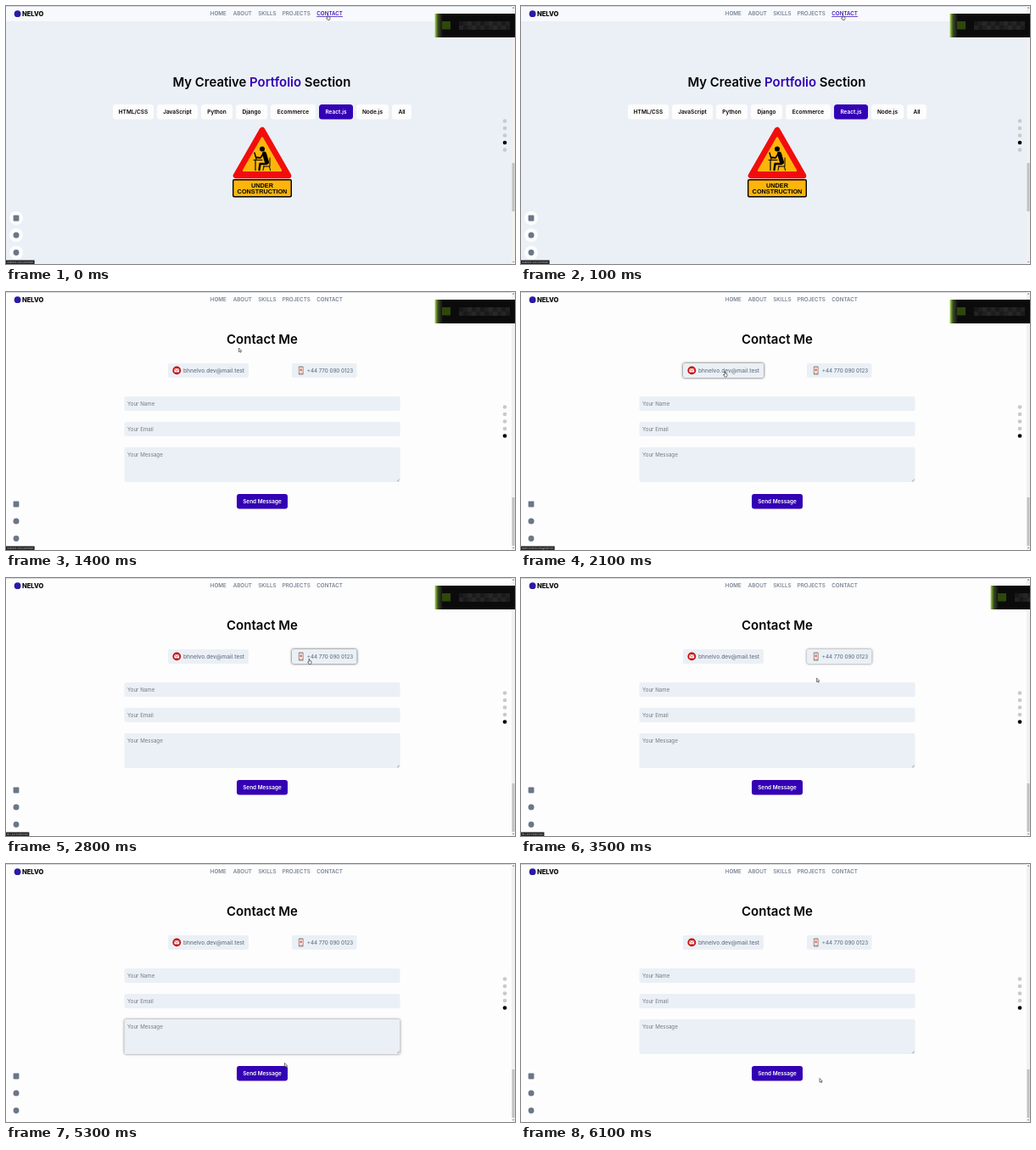
Animation of 600x304 px, one loop 7.7 s. Source, as an HTML page with a canvas:

```html
<!DOCTYPE html>
<html lang="en">
<head>
<meta charset="utf-8">
<title>Portfolio contact page</title>
<style>
html, body { margin: 0; width: 100%; height: 100%; overflow: hidden; background: #fdfdfd; }
canvas { display: block; width: 600px; height: 304px; }
</style>
</head>
<body>
<canvas id="stage" width="600" height="304"></canvas>
<script>
const ctx = document.getElementById('stage').getContext('2d');
const LOOP = 7700, STEP = 100;
const SANS = 'Inter, sans-serif', ARIAL = '"Liberation Sans", Arial, sans-serif';
const PAGE = '#fdfdfd', PALE = '#ebf0f6', GRAY = '#6b7688', PURPLE = '#3302b5', BLACK = '#030303';

const clamp = v => Math.min(1, Math.max(0, v));
const mix = (a, b, k) => a + (b - a) * k;
const smooth = k => k * k * (3 - 2 * k);
const progress = (t, from, to) => clamp((t - from) / (to - from));
// Fades in after `on` and out after `off`, 300 ms each.
const hover = (t, on, off) => progress(t, on, on + 300) * (1 - progress(t, off, off + 300));

function rect(x, y, w, h, color) {
  ctx.fillStyle = color;
  ctx.fillRect(x, y, w, h);
}

function box(x, y, w, h, r, color) {
  ctx.fillStyle = color;
  ctx.beginPath();
  ctx.roundRect(x, y, w, h, r);
  ctx.fill();
}

function circle(x, y, r, color) {
  ctx.fillStyle = color;
  ctx.beginPath();
  ctx.arc(x, y, r, 0, Math.PI * 2);
  ctx.fill();
}

function trace(points, closed) {
  ctx.beginPath();
  points.forEach(([x, y]) => ctx.lineTo(x, y));
  if (closed) ctx.closePath();
}

function line(points, color, width) {
  trace(points);
  ctx.strokeStyle = color;
  ctx.lineWidth = width;
  ctx.stroke();
}

// Text is centred vertically on the capitals.
function text(str, x, y, size, color, weight = 400, align = 'left', family = SANS) {
  ctx.font = `${weight} ${size}px ${family}`;
  ctx.textAlign = align;
  ctx.fillStyle = color;
  ctx.fillText(str, x, y + size * 0.36);
  return ctx.measureText(str).width;
}

function shadowBox(x, y, w, h, glow) {
  ctx.save();
  if (glow > 0) {
    ctx.shadowColor = `rgba(25,25,30,${0.9 * glow})`;
    ctx.shadowBlur = 3;
  }
  box(x, y, w, h, 2, PALE);
  ctx.restore();
}

function roundedTriangle(points, radius, color) {
  trace(points, true);
  ctx.fillStyle = ctx.strokeStyle = color;
  ctx.lineJoin = 'round';
  ctx.lineWidth = radius * 2;
  ctx.fill();
  ctx.stroke();
}

function sign() {
  roundedTriangle([[302, 146], [271, 200], [333, 200]], 3.3, '#f20d0d');
  roundedTriangle([[302, 155.5], [280, 193.8], [324, 193.8]], 1.2, '#fdb50b');
  ctx.lineCap = 'round';
  circle(302, 168.5, 3, BLACK);
  line([[304.5, 174], [307.5, 184]], BLACK, 5);
  line([[303, 174.5], [300, 179], [295.5, 178.5]], BLACK, 1.8);
  line([[307, 186], [299.5, 186], [298.5, 193]], BLACK, 2.4);
  line([[292, 181.5], [302, 181.5]], BLACK, 1.2);
  line([[294, 181], [294, 193.5]], BLACK, 1.2);
  line([[295, 180], [293, 173]], BLACK, 1.5);
  line([[303, 189], [311, 189], [311, 179]], BLACK, 1);
  line([[310.5, 189], [311.5, 193.5]], BLACK, 1);
  line([[304, 189], [303, 193.5]], BLACK, 1);
  box(267, 204, 70, 21.5, 2, BLACK);
  box(268.4, 205.4, 67.2, 18.7, 1, '#fdb50b');
  text('UNDER', 302, 211.2, 7.3, BLACK, 700, 'center', ARIAL);
  text('CONSTRUCTION', 302, 218.6, 7.3, BLACK, 700, 'center', ARIAL);
}

function projects() {
  rect(0, 0, 600, 304, PALE);
  let x = 196.5;
  for (const [part, color] of [['My Creative ', BLACK], ['Portfolio', PURPLE], [' Section', BLACK]])
    x += text(part, x, 89.5, 14.9, color, 600);
  const filters = [
    ['HTML/CSS', 126, 174], ['JavaScript', 178, 226], ['Python', 230, 267], ['Django', 271, 308],
    ['Ecommerce', 312, 365], ['React.js', 369, 409], ['Node.js', 413, 451], ['All', 455, 478]
  ];
  for (const [label, left, right] of filters) {
    const active = label === 'React.js';
    box(left, 116, right - left, 17.5, 3.5, active ? PURPLE : '#fdfdfe');
    text(label, (left + right) / 2, 124.9, 6.5, active ? '#fff' : BLACK, 600, 'center');
  }
  sign();
}

function contactCards(t) {
  shadowBox(191, 84, 95, 17, hover(t, 1500, 2200));
  circle(201.3, 92.4, 4.9, '#c5100f');
  box(198.4, 90.2, 5.8, 4.4, 0.5, '#fff');
  line([[198.6, 90.6], [201.3, 92.9], [204, 90.6]], '#c5100f', 0.7);
  text('bhnelvo.dev@mail.test', 209, 92.5, 6.6, GRAY, 500);

  shadowBox(337, 84, 76.5, 17, hover(t, 2450, 3400));
  box(344.8, 87.4, 5.8, 10.2, 1, '#8b8583');
  box(345.6, 88.8, 4.2, 7, 0.3, '#f6dfd9');
  rect(346.4, 90.6, 2.4, 2.4, '#e5705d');
  circle(347.7, 96.7, 0.5, '#fff');
  text('+44 770 090 0123', 354.8, 92.5, 6.2, GRAY, 500);
}

function contact(t) {
  rect(0, 0, 600, 304, PAGE);
  ctx.save();
  ctx.globalAlpha = progress(t, 850, 1150);
  ctx.translate(0, 50 * (1 - smooth(progress(t, 800, 1200))));
  text('Contact Me', 302, 55.3, 15, BLACK, 600, 'center');
  contactCards(t);
  const fields = [
    ['Your Name', 123, 17, hover(t, 3600, 4200)],
    ['Your Email', 153, 17, hover(t, 4200, 4750)],
    ['Your Message', 183, 41, hover(t, 4850, 5200)]
  ];
  for (const [label, y, h, glow] of fields) {
    shadowBox(139.5, y, 325, h, glow);
    text(label, 143, y + 8.5, 6.2, '#757a80');
  }
  line([[461, 223], [463.5, 220.5]], '#888', 0.5);
  line([[462.4, 223], [463.5, 221.9]], '#888', 0.5);
  box(272, 238, 60, 17.5, 3, t >= 5500 && t < 5900 ? '#2620b0' : PURPLE);
  text('Send Message', 302, 246.9, 6.4, '#fff', 600, 'center');
  ctx.restore();
}

function navigation(t, onProjects) {
  rect(0, 0, 600, 18, onProjects ? '#f7f9fc' : PAGE);
  rect(0, 0, 600, 1, '#d3d6da');
  circle(13.6, 9.2, 3.9, '#2a1ba5');
  text('NELVO', 19, 9.2, 7.5, BLACK, 800);
  const links = [['HOME', 240.7], ['ABOUT', 267.7], ['SKILLS', 297.3], ['PROJECTS', 325.7], ['CONTACT', 366.2]];
  for (const [label, x] of links) {
    const lit = label === 'CONTACT' && t < 1250;
    const width = text(label, x, 9.2, 6.3, lit ? PURPLE : GRAY, 500);
    if (lit) rect(x, 12.3, width, 0.7, PURPLE);
  }
}

function sidebars(onProjects) {
  for (const y of [250, 270, 290.5]) circle(12, y, 8, onProjects ? '#fcfdfe' : '#fefefe');
  box(8.6, 246.6, 6.8, 6.8, 0.8, GRAY);
  circle(12, 270, 3.5, GRAY);
  circle(12, 290.5, 3.4, GRAY);
  for (let i = 0; i < 5; i++)
    circle(588, 135.5 + i * 8.5, 2.3, i === (onProjects ? 3 : 4) ? '#000' : '#c9c9c9');
  rect(596, 0, 4, 304, '#f1f1f1');
  rect(596.5, onProjects ? 185 : 242, 3, 57, '#c1c1c1');
  rect(597.3, 1.6, 1.6, 1, '#555');
  rect(597.3, 301, 1.6, 1, '#777');
}

function statusBar(t) {
  let label = '';
  if (t < 1500) label = 'localhost:3000/#contact';
  else if (t >= 1600 && t < 2500) label = 'mailto:bhnelvo.dev@mail.test';
  else if (t >= 2500 && t < 3700) label = 'tel:+447700900123';
  if (!label) return;
  ctx.font = `400 2.7px ${SANS}`;
  rect(0, 299.5, ctx.measureText(label).width + 2.4, 4.5, '#202124');
  text(label, 1, 301.8, 2.7, '#c8cacc');
}

function notification(t) {
  if (t >= 3700) return;
  ctx.save();
  ctx.translate(96 * smooth(progress(t, 3300, 3700)), 0);
  const edge = ctx.createLinearGradient(505, 0, 515, 0);
  edge.addColorStop(0, '#c4dc94');
  edge.addColorStop(0.2, '#77a629');
  edge.addColorStop(0.42, '#3c4a2a');
  edge.addColorStop(1, '#0b0b0b');
  rect(505.5, 9, 95, 28, edge);
  rect(514, 18, 10, 9.5, '#2e480c');
  for (let i = 0; i < 12; i++)
    for (let row = 0; row < 2; row++) {
      const shade = 24 + (i * 7 + row * 11) % 17;
      rect(534 + i * 5, 18 + row * 5, 5, 5, `rgb(${shade},${shade},${shade})`);
    }
  ctx.restore();
}

const PATH = [
  [0, 379, 10.5], [1100, 379, 10.5], [1400, 274.5, 66], [1700, 236, 92], [1900, 240, 94],
  [2100, 240, 94], [2700, 357, 95.5], [3200, 357, 95.5], [3600, 347, 122], [3900, 342, 132],
  [4000, 342, 133], [4300, 335.8, 155.5], [4700, 332, 168], [5000, 328, 205], [5300, 328.5, 234.5],
  [5500, 328, 247], [5800, 328, 248], [6100, 352, 252.5], [LOOP, 352, 252.5]
];

function cursorAt(t) {
  const i = Math.max(1, PATH.findIndex(p => p[0] > t));
  const [t0, x0, y0] = PATH[i - 1], [t1, x1, y1] = PATH[i];
  const k = smooth(progress(t, t0, t1));
  return [mix(x0, x1, k), mix(y0, y1, k)];
}

function cursor(t) {
  const [x, y] = cursorAt(t);
  const inside = (l, top, r, b) => x > l && x < r && y > top && y < b;
  const onField = inside(140, 123, 464, 140) || inside(140, 153, 464, 170) || inside(140, 183, 464, 224);
  const onLink = inside(366, 5, 398, 14) || inside(191, 84, 286, 101) ||
    inside(337, 84, 413, 101) || inside(272, 238, 332, 256);
  const arrow = [[0, 0], [0, 4.6], [1.1, 3.7], [1.9, 5.3], [2.6, 4.9], [1.9, 3.4], [3.2, 3.3]];
  const hand = [[0, 0], [0.8, 0], [0.9, 2], [3, 2.6], [3, 4.4], [2.3, 6], [0.2, 6], [-1.4, 3.8], [-1, 3.2], [0, 3.8]];
  ctx.save();
  ctx.translate(x, y);
  ctx.lineCap = 'butt';
  if (onField) {
    line([[0, -2.3], [0, 2.3]], '#333', 0.7);
    line([[-1, -2.3], [1, -2.3]], '#333', 0.5);
    line([[-1, 2.3], [1, 2.3]], '#333', 0.5);
  } else {
    trace(onLink ? hand : arrow, true);
    ctx.fillStyle = '#fff';
    ctx.strokeStyle = '#222';
    ctx.lineWidth = 0.6;
    ctx.fill();
    ctx.stroke();
  }
  ctx.restore();
}

function draw(now) {
  const t = Math.floor((now % LOOP) / STEP) * STEP;
  const onProjects = t < 600;
  if (onProjects) projects();
  else contact(t);
  navigation(t, onProjects);
  sidebars(onProjects);
  notification(t);
  statusBar(t);
  cursor(t);
}

const start = performance.now();
function tick() {
  draw(performance.now() - start);
  requestAnimationFrame(tick);
}
tick();
</script>
</body>
</html>
```
